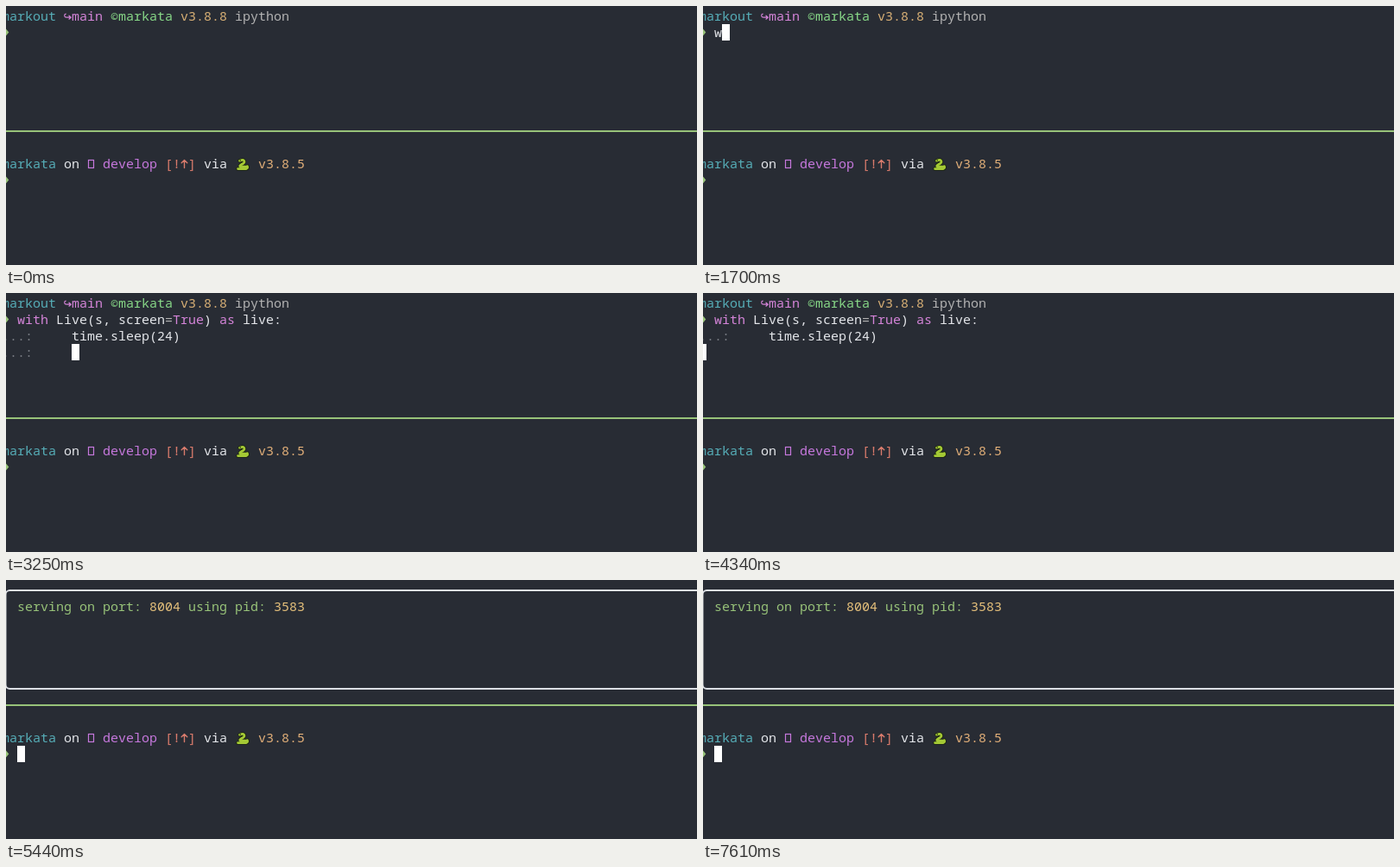
These frames come from a looping animation (800 px wide and 300 px high, 8 s). An HTML page:

```html
<!DOCTYPE html>
<html lang="en">
<head>
<meta charset="utf-8">
<title>Terminal panes</title>
<style>
html, body { margin: 0; width: 100%; height: 100%; overflow: hidden; background: #282c34; }
svg { display: block; width: 800px; height: 300px; }
text { font: 500 15px "Noto Sans Mono", "DejaVu Sans Mono", monospace; font-variant-ligatures: none; white-space: pre; }
</style>
</head>
<body>
<svg id="stage" viewBox="0 0 800 300" xmlns="http://www.w3.org/2000/svg">
  <rect width="800" height="300" fill="#282c34"/>
  <g id="shell">
    <g id="head"></g>
    <g id="typed"></g>
  </g>
  <g id="live">
    <rect x="-.5" y="12" width="820" height="114" rx="5" fill="none" stroke="#dcdfe4" stroke-width="2"/>
  </g>
  <rect y="144" width="800" height="2" fill="#98c379"/>
  <g id="lower"></g>
  <rect id="caret" width="9" height="19" fill="#fff"/>
  <path id="mouse" d="M.5 .5V16.5L4.2 13L6.8 18.6L9.3 17.5L6.8 12H11.8Z" fill="#fff" stroke="#111" stroke-width="1"/>
</svg>
<script>
const NS = "http://www.w3.org/2000/svg";
const LOOP = 8000;
const C = {
  teal: "#56adb7", pink: "#d484d8", violet: "#c678dd", lime: "#87d787", sand: "#d7af75",
  gray: "#b2b2b2", dim: "#7d8188", white: "#e4e6ea", green: "#98c379", gold: "#e5c07b",
  red: "#d97b6c", orange: "#e0ae78", match: "#afd7d7"
};
const $ = id => document.getElementById(id);
const colX = c => 9 * c - 5;
const rowY = r => 19 * r + 2;

function add(parent, tag, attrs, text) {
  const el = document.createElementNS(NS, tag);
  for (const k in attrs) el.setAttribute(k, attrs[k]);
  if (text) el.textContent = text;
  parent.append(el);
  return el;
}

// Writes coloured runs from a cell; a run is [text, colour].
function write(parent, row, col, runs) {
  for (const [str, fill] of runs) {
    if (fill) add(parent, "text", { x: colX(col), y: rowY(row) + 15, fill }, str);
    col += str.length;
  }
}

function line(parent, x, y, d, stroke, width) {
  return add(parent, "path", {
    d, stroke, "stroke-width": width, fill: "none", transform: `translate(${x} ${y})`,
    "stroke-linecap": "round", "stroke-linejoin": "round"
  });
}

function chevron(parent, row) {
  add(parent, "path", { d: "M-3 5H-.5L3.3 9.5L-.5 14H-3L0 9.5Z", fill: C.green, transform: `translate(0 ${rowY(row)})` });
}

function snake(parent, x, y) {
  const body = "M4.5 3.2Q9.5 1.2 10 4.2Q10 6.2 6.5 7.6Q3.2 9.6 6 10.2H11.5M2.5 12.6H12Q14.5 12 13.4 9.6";
  line(parent, x, y, body, "#1b2410", 4.4);
  line(parent, x, y, body, "#a4c935", 2.7);
  add(parent, "circle", { cx: x + 5.3, cy: y + 2.7, r: .7, fill: "#1b2410" });
}

function group(parent) { return add(parent, "g", {}); }

// Upper pane
const head = $("head"), typed = $("typed");
write(head, 0, 0, [["markout", C.teal], ["  "], ["main", C.pink], [" "], ["©markata", C.lime], [" "],
  ["v3.8.8", C.sand], [" "], ["ipython", C.gray]]);
line(head, 67, 9, "M2.2 .2Q.5 .6 .7 2.4Q1 4.2 3 4.2H8M6 2.2L8.2 4.2L6 6.2", C.pink, 1.2);
chevron(head, 1);

const partial = add(typed, "text", { x: colX(2), y: rowY(1) + 15, fill: C.white });
const code = group(typed);
write(code, 1, 2, [["with", C.pink], [" "], ["Live(s, screen", C.white], ["=", C.gray], ["True", C.pink],
  [")", C.white], [" "], ["as", C.pink], [" "], ["live:", C.white]]);
write(code, 2, 0, [["...:", C.dim], ["     "], ["time.sleep(24)", C.white]]);

const marks = group(typed);
for (const [col, ch] of [[19, "("], [22, ")"]]) {
  add(marks, "rect", { x: colX(col), y: rowY(2), width: 9, height: 19, fill: C.match });
  write(marks, 2, col, [[ch, "#101010"]]);
}
const more = group(typed);
write(more, 3, 0, [["...:", C.dim]]);

write($("live"), 1, 2, [["serving on port: ", C.green], ["8004", C.gold], [" using pid: ", C.green], ["3583", C.gold]]);

// Lower pane
const lower = $("lower");
write(lower, 9, 0, [["markata", C.teal], [" "], ["on", C.white], ["   "], ["develop", C.violet], [" "],
  ["[!", C.red], [" "], ["]", C.red], [" "], ["via", C.white], ["    "], ["v3.8.5", C.orange]]);
add(lower, "rect", { x: 95.5, y: 178.5, width: 6, height: 9, fill: "none", stroke: C.violet, "stroke-width": 1.2 });
line(lower, 202, 178, "M4.5 9.5V.5M1.2 3.8L4.5 .5L7.8 3.8", C.red, 1.4);
snake(lower, 266, 176);
chevron(lower, 10);

const show = (el, on) => el.setAttribute("visibility", on ? "visible" : "hidden");

// Caret cell over time: [start, column, row]
const carets = [
  [0], [780, 2, 1], [1700, 3, 1], [1850, 4, 1], [2170, 23, 2], [3250, 9, 3], [4340, 0, 3], [4420],
  [5440, 2, 10], [6220, 51, 5], [6290, 2, 10], [6770, 51, 5], [6840, 2, 10], [7530, 51, 5], [7610, 2, 10]
];
const glide = [70, 150, 220, 300, 370, 460, 530];

function draw(t) {
  const [, col, row] = carets.filter(c => c[0] <= t).pop();
  show($("caret"), row !== undefined);
  if (row !== undefined) {
    $("caret").setAttribute("x", colX(col));
    $("caret").setAttribute("y", rowY(row));
  }

  const live = t >= 4420;
  $("shell").style.display = live ? "none" : "";
  $("live").style.display = live ? "" : "none";
  partial.textContent = t >= 1700 && t < 2170 ? "wi".slice(0, t < 1850 ? 1 : 2) : "";
  show(code, t >= 2170);
  show(marks, t >= 2170 && t < 3250);
  show(more, t >= 3250 && t < 4340);

  const step = glide.filter(s => s <= t).length - 1;
  const seen = step >= 0 && step < 6;
  show($("mouse"), seen);
  if (seen) {
    const u = 1 - step / 5;
    const x = 637 + 150 * u ** 1.75, y = 111 + 90 * u ** 2.1;
    $("mouse").setAttribute("transform", `translate(${Math.round(x)} ${Math.round(y)})`);
  }
}

const start = performance.now();
function tick() {
  draw((performance.now() - start) % LOOP);
  requestAnimationFrame(tick);
}
draw(0);
requestAnimationFrame(tick);
</script>
</body>
</html>
```
